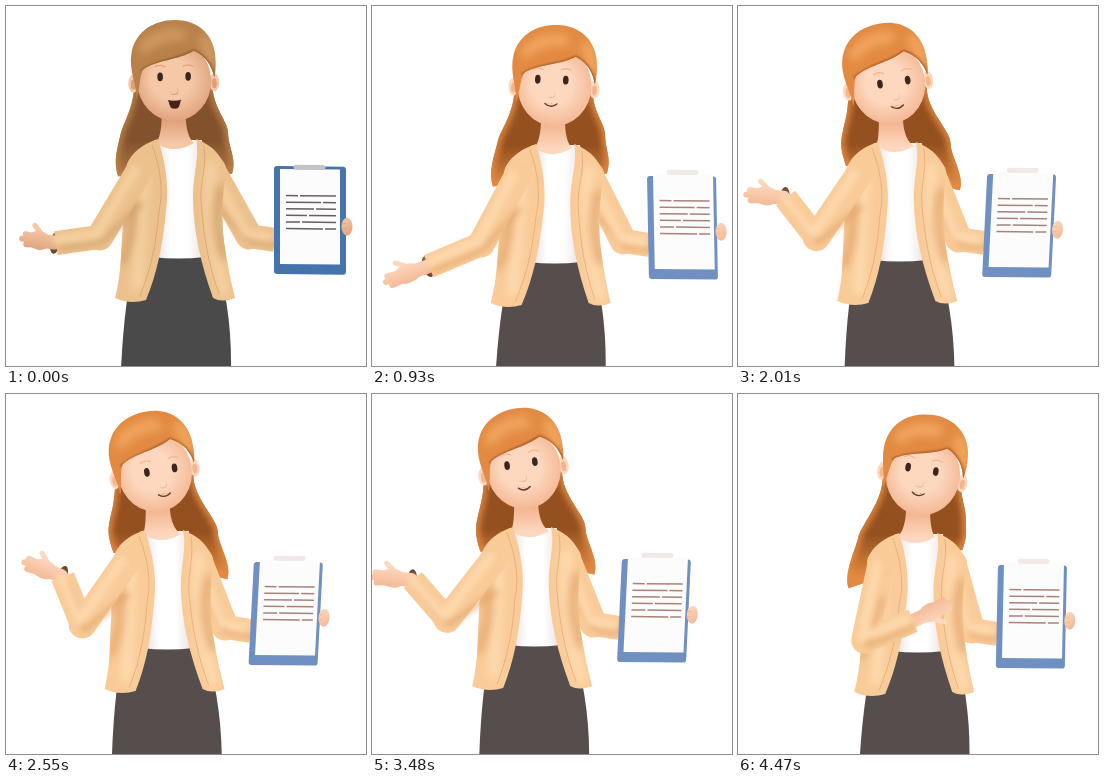
An HTML page with a canvas that plays this animation: 360 px wide and 360 px high, repeating every 4500 ms.

```html
<!DOCTYPE html>
<html>
<head>
<meta charset="utf-8">
<title>Presenter with clipboard</title>
<style>
html, body { margin: 0; width: 100%; height: 100%; overflow: hidden; background: #fff; }
canvas { display: block; width: 100vmin; height: 100vmin; }
</style>
</head>
<body>
<canvas id="stage" width="360" height="360"></canvas>
<script>
const ctx = document.getElementById('stage').getContext('2d');
const LOOP = 4500, BLINK = 1590;

// Each pose holds between from and to (ms). Arm: upper, fore and hand angles in degrees, then reach.
const poses = [
  { from: 0, to: 0, x: 0, y: 0, tilt: -1, look: 1, talk: 1, board: 274, arm: [121, 172, 189, .85] },
  { from: 500, to: 1120, x: 12, y: 5, tilt: 2, look: -2, talk: 0, board: 281, arm: [118, 157, 161, 1.1] },
  { from: 1590, to: 1590, x: 1, y: 3, tilt: -2, look: 4, talk: 0, board: 273, arm: [111, 12, -30, .45] },
  { from: 2090, to: 3150, x: -13, y: 3, tilt: -9, look: 7, talk: 0, board: 254, arm: [125, 248, 202, 1] },
  { from: 3480, to: 3760, x: -11, y: 0, tilt: -8, look: -1, talk: 0, board: 256, arm: [128, 229, 186, 1] },
  { from: 4110, to: 4110, x: -6, y: 0, tilt: -3, look: 3, talk: .5, board: 258, arm: [115, 258, 237, .9] },
  { from: 4330, to: LOOP, x: 9, y: 6, tilt: 9, look: -1, talk: 0, board: 266, arm: [102, 338, 335, 1] }
];

const lerp = (a, b, k) => a + (b - a) * k;
const clamp = v => Math.max(0, Math.min(1, v));
const rad = deg => deg * Math.PI / 180;
const polar = ([x, y], deg, r) => [x + r * Math.cos(rad(deg)), y + r * Math.sin(rad(deg))];

function poseAt(t) {
  const i = Math.max(1, poses.findIndex(p => p.to > t));
  const a = poses[i - 1], b = poses[i];
  const s = clamp((t - a.to) / (b.from - a.to)), k = s * s * (3 - 2 * s);
  const pose = { warmth: i === 1 ? k : 1 };
  for (const name in a) {
    pose[name] = name === 'arm' ? a.arm.map((v, j) => lerp(v, b.arm[j], k)) : lerp(a[name], b[name], k);
  }
  return pose;
}

function mix(a, b, k) {
  const part = (c, i) => parseInt(c.slice(i, i + 2), 16);
  return `rgb(${[1, 3, 5].map(i => Math.round(lerp(part(a, i), part(b, i), k)))})`;
}

function palette(k) {
  const tones = {
    hair: ['#cf9a62', '#f3a65f'], hairMid: ['#b98149', '#e28a42'], hairDark: ['#84512d', '#94501f'],
    skin: ['#f5c8a8', '#fdd8bf'], skinDark: ['#dfa079', '#f3b691'],
    coat: ['#f5d0a0', '#fdd9ae'], coatMid: ['#ecc18d', '#f9cb98'], coatDark: ['#cf9f68', '#e3a56c'],
    skirt: ['#4a4a4a', '#564e4c'], board: ['#4773ab', '#6f90c0'],
    ink: ['#66605e', '#a98378'], clip: ['#c3c4c8', '#f1e9e6']
  };
  return Object.fromEntries(Object.entries(tones).map(([name, [a, b]]) => [name, mix(a, b, k)]));
}

function gradient(x0, y0, x1, y1, ...colors) {
  const g = ctx.createLinearGradient(x0, y0, x1, y1);
  colors.forEach((c, i) => g.addColorStop(i / (colors.length - 1), c));
  return g;
}

function fill(path, style) {
  ctx.fillStyle = style;
  ctx.fill(new Path2D(path));
}

function line(path, style, width, cap = 'round') {
  ctx.strokeStyle = style;
  ctx.lineWidth = width;
  ctx.lineCap = cap;
  ctx.lineJoin = 'round';
  ctx.stroke(new Path2D(path));
}

function oval(x, y, rx, ry, style) {
  ctx.beginPath();
  ctx.ellipse(x, y, rx, ry, 0, 0, 7);
  ctx.fillStyle = style;
  ctx.fill();
}

// Blurred strokes kept inside a shape give it a rounded look.
function shade(shape, path, style, width, blur = 4) {
  ctx.save();
  ctx.clip(new Path2D(shape));
  ctx.filter = `blur(${blur}px)`;
  line(path, style, width);
  ctx.restore();
}

function sleeve(shoulder, elbow, wrist, c) {
  oval(...shoulder, 14, 14, c.coatMid);
  line(`M${shoulder}L${elbow}`, c.coatMid, 27);
  line(`M${elbow}L${wrist}`, c.coatMid, 24, 'butt');
  ctx.save();
  ctx.filter = 'blur(3px)';
  ctx.translate(2, 5);
  line(`M${polar(shoulder, 90, 28)}L${elbow}L${wrist}`, c.coatDark, 4, 'butt');
  ctx.translate(-5, -8);
  line(`M${shoulder}L${elbow}L${wrist}`, c.coat, 9, 'butt');
  ctx.restore();
}

function drawBackHair(x, y, tilt, c) {
  const shape = [-1, 1].map(side => {
    const top = x + side * 39, end = x + side * 57 - 1.8 * tilt;
    const endY = y + 92 - side * (1.8 * tilt + 3), midY = (y + endY) / 2;
    const bulge = lerp(top, end, .6) + side * 4;
    return [`${top} ${y}C${top} ${y + 25} ${bulge - side * 3} ${midY - 8} ${bulge} ${midY + 5}S${end + side * 5} ${endY - 15} ${end} ${endY}`,
      `${end} ${endY}C${end + side * 5} ${endY - 15} ${bulge} ${midY + 18} ${bulge} ${midY + 5}S${top} ${y + 25} ${top} ${y}`];
  });
  const path = `M${shape[0][0]}L${shape[1][1]}Z`;
  fill(path, gradient(0, y + 15, 0, y + 100, c.hairDark, c.hairDark, c.hairMid));
  shade(path, path, c.hairMid, 7, 3);
}

function drawBody(c, neckShift) {
  fill('M130 245Q118 295 115 364H225Q226 300 208 245Z',
    gradient(114, 0, 226, 0, c.skirt, c.skirt, c.skirt, c.skirt));
  fill('M148 134H196L199 251Q172 254 146 251Z', gradient(148, 0, 198, 0, '#e4dddd', '#fff', '#fff', '#e9e2e0'));
  const l = 156 + neckShift, r = 180 + neckShift;
  fill(`M${l} 108Q${l} 130 150 137Q168 149 188 137Q${r} 130 ${r} 108Z`, gradient(0, 114, 0, 138, c.skinDark, c.skin));
  const left = `M152 133Q128 141 121 158Q117 215 115 250Q114 272 109 292Q124 299 140 294
    C151 268 157 238 160 205C164 178 158 152 152 133Z`;
  const right = `M190 133Q214 142 220 164Q214 205 218 235Q222 265 229 292Q216 297 207 292
    C195 258 187 225 187 190C187 168 194 150 190 133Z`;
  for (const panel of [left, right]) {
    fill(panel, c.coatMid);
    shade(panel, 'M138 160L131 280M205 160Q200 220 218 285', c.coat, 12);
  }
  shade(left, 'M122 182Q133 215 116 256', c.coatDark, 7);
  shade(right, 'M215 182Q206 215 218 250', c.coatDark, 7);
  line('M146 139C154 160 158 184 153 205C150 240 145 262 134 290M198 140C201 162 194 174 195 195C198 238 204 262 213 288', c.coatDark, .7);
}

function drawBoard({ board, y, warmth }, c) {
  const skew = (board - 274) * .25;
  ctx.save();
  ctx.transform(1, .01, skew / 95, 1, board, y + 163);
  ctx.fillStyle = c.board;
  ctx.beginPath();
  const top = lerp(-3, 2, warmth);
  ctx.roundRect(-6, top, lerp(72, 69, warmth), 105 - top, 3);
  ctx.fill();
  fill('M0 0H60V95H0Z', '#fdfcfc');
  line('M16 -2H43', c.clip, 5);
  for (let i = 0; i < 6; i++) {
    const row = 26.5 + i * 6.6, gap = 18 + i * 23 % 30;
    line(`M6 ${row}H${gap}M${gap + 2} ${row}H56`, c.ink, 1.5, 'butt');
  }
  oval(67, 57, 5.5, 9, gradient(61, 50, 72, 66, c.skin, c.skinDark));
  line('M62 54h4M62 59h4', c.skinDark, .8);
  ctx.restore();
}

function drawHand(wrist, angle, len, c) {
  ctx.save();
  ctx.translate(...wrist);
  ctx.rotate(rad(angle));
  ctx.globalAlpha = clamp(-2 * Math.cos(rad(angle)));
  oval(1, 0, 5, 11, '#68432d');
  ctx.globalAlpha = 1;
  const skin = gradient(0, 12, 0, -12, c.skin, c.skinDark);
  line(`M2 0H${len * .45}`, skin, 14);
  oval(len * .45, 0, len * .25 + 2, 9.5, skin);
  for (const d of [-6, -1, 4]) line(`M${len * .4} ${d * .7}L${len - 3 - Math.abs(d)} ${d}`, skin, 6);
  line(`M${len * .35} 4Q${len * .5} 10 ${len * .62} 14`, skin, 5);
  ctx.restore();
}

function drawHead(x, y, { tilt, look, talk }, lid, c) {
  ctx.save();
  ctx.translate(x, y);
  ctx.rotate(rad(tilt));
  for (const ear of [-40, 41]) {
    oval(ear, 0, 5, 9, c.skin);
    oval(ear, 1, 2.5, 5, c.skinDark);
  }
  const glow = ctx.createRadialGradient(-2, -4, 20, 1, -2, 42);
  glow.addColorStop(0, c.skin);
  glow.addColorStop(1, c.skinDark);
  oval(1, -2, 37, 40, glow);

  ctx.save();
  ctx.translate(look, look * .6 - 7);
  for (const eye of [-14, 14]) {
    oval(eye, 0, 2.8, Math.max(.8, 4.4 * lid), '#3b2720');
    line(`M${eye - 5} -10q5 -3 10 0`, c.skinDark, 1.3);
  }
  oval(0, 14.5, 4, 4, c.skinDark);
  oval(-.4, 13.6, 3.9, 3.8, c.skin);
  line(`M-6 24Q0 ${29 - talk * 2} 6 24`, '#6b362a', 1.4);
  fill(`M-6 24H6Q5 ${24 + 9 * talk} 0 ${24 + 8 * talk}Q-5 ${24 + 9 * talk} -6 24Z`, '#4b201b');
  ctx.restore();

  const cap = `M-37 16C-36 2 -45 -14 -41 -32C-36 -53 -18 -63 2 -63C24 -63 39 -50 42 -30
    C43 -20 43 -10 41 -5C39 -16 34 -26 21 -32C6 -23 -18 -23 -30 -14C-34 -6 -33 4 -37 16Z`;
  fill(cap, c.hairMid);
  shade(cap, 'M-28 -36Q-14 -50 8 -48M32 -42Q38 -32 38 -22', c.hair, 12, 5);
  shade(cap, 'M-31 -13C-18 -23 6 -23 21 -32C34 -26 39 -16 41 -5', c.hairDark, 2, 1);
  ctx.restore();
}

function draw(t) {
  const pose = poseAt(t), c = palette(pose.warmth);
  const { x, y, tilt, board } = pose;
  const [upper, fore, hand, reach] = pose.arm;
  const headX = 168 + x + .75 * tilt, headY = 77 + y;
  const lid = clamp(.15 + Math.abs(t - BLINK) / 130);

  ctx.fillStyle = '#fff';
  ctx.fillRect(0, 0, 360, 360);
  drawBackHair(headX, headY, tilt, c);

  const grip = [board - 5 + (board - 274) * .2, y + 234];
  sleeve([206 + x, 164 + y], [grip[0] - 26, grip[1] - 4], grip, c);

  // The hips follow the shoulders only part of the way.
  const lean = -.2 * x / 154;
  ctx.save();
  ctx.transform(1, 0, lean, 1, x - lean * 140, y);
  drawBody(c, .3 * tilt);
  ctx.restore();
  drawBoard(pose, c);

  const shoulder = [134 + x, 164 + y];
  const elbow = polar(shoulder, upper, 78), wrist = polar(elbow, fore, 52 * reach);
  drawHand(wrist, hand, 45 * reach, c);
  sleeve(shoulder, elbow, wrist, c);
  drawHead(headX, headY, pose, lid, c);
}

function tick(now) {
  draw(now % LOOP);
  requestAnimationFrame(tick);
}
requestAnimationFrame(tick);
</script>
</body>
</html>
```
